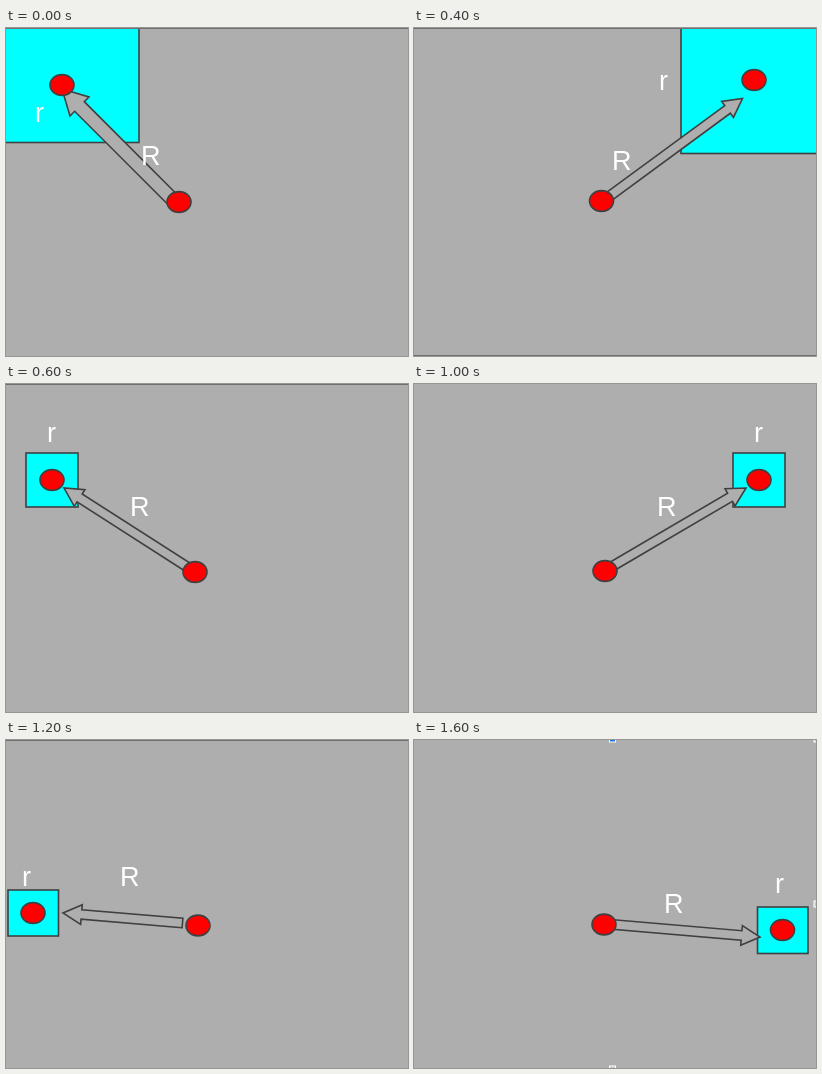
Animation, 402 px wide and 328 px high, one loop 1800 ms. Source, as an HTML page:

```html
<!DOCTYPE html>
<html lang="en">
<head>
<meta charset="utf-8">
<title>Vectors R and r</title>
<style>
  html, body { margin: 0; width: 100%; height: 100%; overflow: hidden; background: #aeaeae; }
  svg { display: block; width: 402px; height: 328px; }
  .pose { opacity: 0; animation: show 1800ms step-end infinite; }
  .box, .arrow, .dot { stroke: #404040; stroke-width: 1.6; }
  .box { fill: #0ff; }
  .arrow { fill: #aeaeae; }
  .dot { fill: #f00; }
  .edge { fill: #707070; }
  .handle { fill: #1a73e8; stroke: #fff; }
  .handle.pale { fill: #c4c8ce; }
  text { font: 27px "Liberation Sans", Arial, sans-serif; fill: #fff; }
  @keyframes show {
    0% { opacity: 1; }
    11.1111%, 100% { opacity: 0; }
  }
</style>
</head>
<body>
<svg id="stage" viewBox="0 0 402 328"></svg>
<script>
const W = 402, H = 328, STEP = 200;

// box: left, top, right, bottom; arrow: tail x, y, tip x, y
const poses = [
  { box: [-2, -2, 133, 114.5], dots: [[56, 57], [173, 174]], arrow: [166.5, 171.5, 56, 61],
    size: [6.8, 13.4, 24.7], r: [29, 94], R: [135, 137], top: 1 },
  { box: [102, -2, 216.5, 96.5], dots: [[159, 47.5], [172, 173.5]], arrow: [167.5, 162, 150.5, 54],
    r: [77, 70], R: [134, 137] },
  { box: [267, -2, 404, 125.5], dots: [[340, 52], [187.5, 173]], arrow: [193, 170, 328.5, 70.5],
    r: [245, 62], R: [198, 142], top: 1, bottom: 1 },
  { box: [20, 69, 72, 123], dots: [[46, 96], [189, 188]], arrow: [183, 184, 58, 104],
    r: [41, 58], R: [124, 132], top: 1 },
  { box: [149, 69, 201, 123], dots: [[175, 96], [189.5, 189.5]], arrow: [185, 185, 165, 98],
    r: [111, 106], R: [144, 179], top: 1, bottom: 1,
    handles: [[0, 0], [201, 0], [W, 0], [0, 164], [W, 164], [0, H], [201, H], [W, H]] },
  { box: [319, 69, 371, 123], dots: [[345, 96], [191, 187]], arrow: [197, 183, 332, 104],
    r: [340, 58], R: [243, 132] },
  { box: [2, 150, 52.5, 196], dots: [[27, 173], [192, 185.5]], arrow: [176.5, 183, 57, 173],
    r: [16, 146], R: [114, 146], top: 1 },
  { box: [165, 163, 215.5, 209], dots: [[190.5, 185.5]],
    r: [186, 151], R: [230, 151], top: 1, bottom: 1 },
  { box: [343.5, 167, 394, 213.5], dots: [[190, 184.5], [368.5, 190]], arrow: [199, 184.5, 346, 197],
    r: [361, 153], R: [250, 173],
    handles: [[198.5, -1]], pale: [[198.5, H + 1], [W + 1, 164], [W + 1, -1]] }
];

const stage = document.getElementById("stage");

function add(parent, tag, attrs, text) {
  const el = document.createElementNS("http://www.w3.org/2000/svg", tag);
  for (const key in attrs) el.setAttribute(key, attrs[key]);
  if (text) el.textContent = text;
  parent.appendChild(el);
  return el;
}

function addRect(parent, cls, x, y, width, height) {
  add(parent, "rect", { class: cls, x, y, width, height });
}

// size: half shaft width, half head width, head length
function addArrow(parent, [x1, y1, x2, y2], [shaft, head, len] = [4.7, 9.9, 18.5]) {
  const total = Math.hypot(x2 - x1, y2 - y1);
  const angle = Math.atan2(y2 - y1, x2 - x1) * 180 / Math.PI;
  const neck = total - len;
  add(parent, "path", {
    class: "arrow",
    transform: `translate(${x1} ${y1}) rotate(${angle})`,
    d: `M0 ${-shaft}H${neck}V${-head}L${total} 0L${neck} ${head}V${shaft}H0Z`
  });
}

poses.forEach((p, i) => {
  const g = add(stage, "g", { class: "pose" });
  g.style.animationDelay = (i - poses.length) * STEP + "ms";

  const [left, top, right, bottom] = p.box;
  addRect(g, "box", left, top, right - left, bottom - top);
  if (p.top) addRect(g, "edge", 0, 0, W, 1);
  if (p.bottom) addRect(g, "edge", 0, H - 1, W, 1);
  if (p.arrow) addArrow(g, p.arrow, p.size);
  for (const [cx, cy] of p.dots) add(g, "ellipse", { class: "dot", cx, cy, rx: 12, ry: 10.4 });
  for (const name of ["r", "R"]) add(g, "text", { x: p[name][0], y: p[name][1] }, name);
  for (const [x, y] of p.handles || []) addRect(g, "handle", x - 3, y - 3, 6, 6);
  for (const [x, y] of p.pale || []) addRect(g, "handle pale", x - 3, y - 3, 6, 6);
});
</script>
</body>
</html>
```
